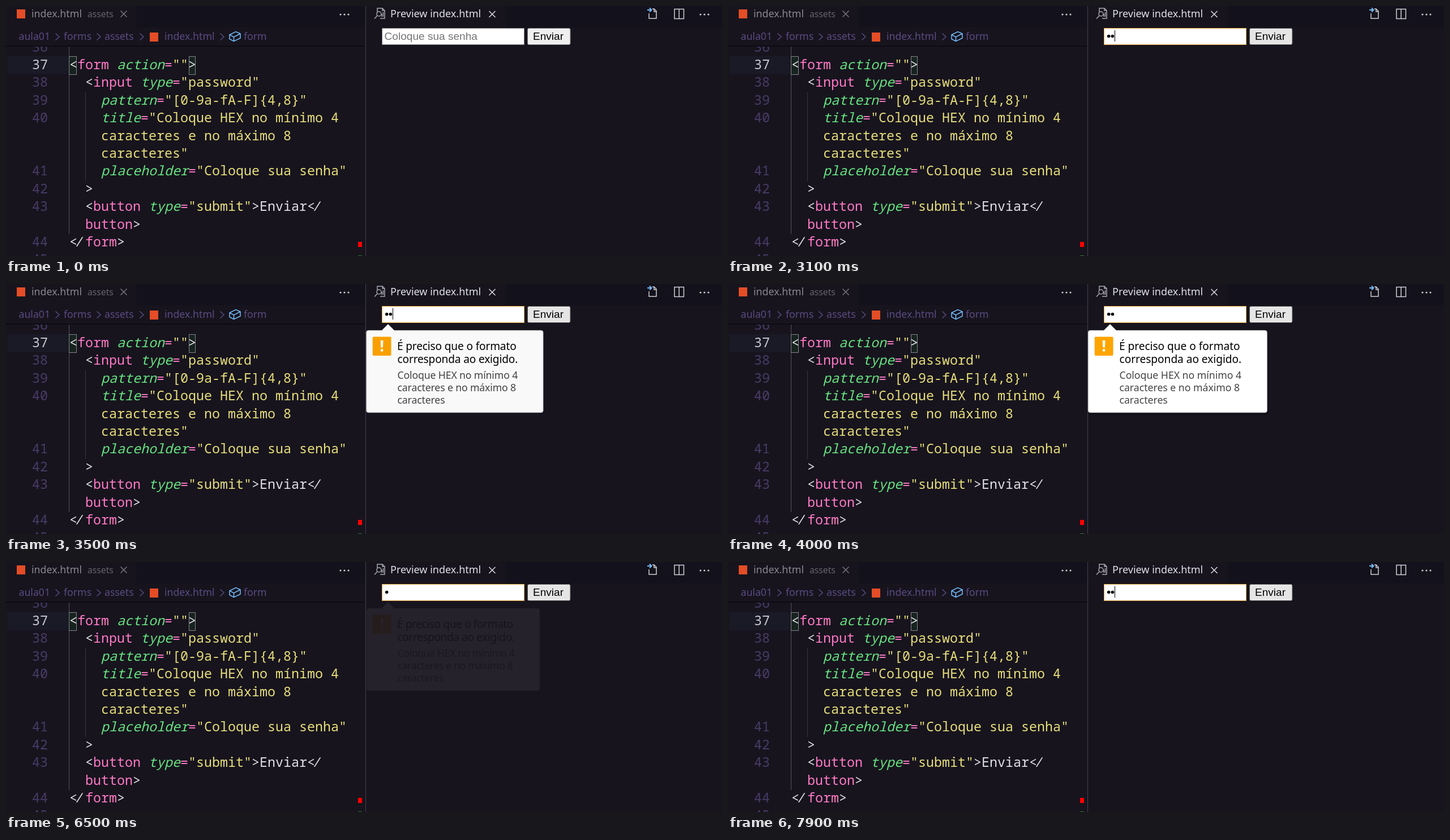
Write an HTML page that moves like this. It is 1265 by 443 pixels and loops after 8000 ms.

```html
<!DOCTYPE html>
<html lang="pt-BR">
<head>
<meta charset="utf-8">
<title>Password pattern validation</title>
<style>
  html, body { margin: 0; width: 100%; height: 100%; overflow: hidden; background: #17141e; }
  svg { display: block; width: 1265px; height: 443px; }
  text { white-space: pre; font-family: "Noto Sans", "Open Sans", sans-serif; }
  .code text { font-family: "Noto Sans Mono", "DejaVu Sans Mono", monospace; font-size: 23.33px; }
  .num { fill: #483c67; }
  .w, .slash { fill: #e1e1e6; }
  .p { fill: #ff79c6; }
  .g { fill: #67e480; }
  .g, .slash { font-style: italic; }
  .y { fill: #e7de79; }
  .crumb { font-size: 17.7px; fill: #5a4b81; }
  .tab { font-size: 18px; }
  .field text { font: 19.07px "Liberation Sans", Arial, sans-serif; }
  .line { fill: none; stroke-width: 1.5; }
  .main { font-size: 19.1px; fill: #000; }
  .sub { font-size: 17.7px; fill: #444; }
</style>
</head>
<body>
<svg viewBox="0 0 1265 443">
  <defs>
    <filter id="shadow" x="-10%" y="-10%" width="120%" height="125%">
      <feDropShadow dx="1" dy="2" stdDeviation="2" flood-color="#000" flood-opacity=".55"/>
    </filter>
    <path id="close" class="line" d="M-5.5-5.5 5.5 5.5M5.5-5.5-5.5 5.5"/>
    <path id="chevron" class="line" d="M-3.5-6 3 0-3.5 6" stroke="#5a4b81"/>
    <g id="dots" fill="#d0d0d6">
      <circle cx="-7" r="1.6"/><circle r="1.6"/><circle cx="7" r="1.6"/>
    </g>
  </defs>
  <rect width="1265" height="443" fill="#17141e"/>

  <!-- editor -->
  <rect y="89" x="2" width="108" height="32" fill="#1a1926"/>
  <g fill="#17231f" stroke="#85858c">
    <rect x="111.5" y="89.5" width="13" height="32"/>
    <rect x="323.5" y="89.5" width="11" height="32"/>
  </g>
  <path d="M111.5 70V89M111.5 122V404" stroke="#56535f"/>
  <path d="M140.5 153V310" stroke="#383544"/>
  <g class="code" id="code"></g>
  <rect x="622" y="418" width="7" height="9" fill="#f00"/>
  <rect x="622" y="442" width="7" height="1" fill="#2f7a2f"/>

  <!-- tabs and breadcrumbs -->
  <rect width="635" height="71" fill="#17141e"/>
  <rect y="70" width="635" height="2" fill="#0d0b12"/>
  <rect x="230" width="405" height="38" fill="#13111b"/>
  <rect x="883" width="382" height="38" fill="#13111b"/>
  <rect x="635" width="1" height="443" fill="#45424f"/>
  <g fill="#e44d26">
    <rect x="19" y="6" width="15" height="16"/>
    <rect x="254" y="47" width="15" height="16"/>
  </g>
  <text class="tab" x="45" y="20" style="font-size:17.8px" fill="#8a8792">index.html</text>
  <text x="144" y="20" font-size="15.7" fill="#66636f">assets</text>
  <use href="#close" x="208" y="14" stroke="#77737f"/>
  <use href="#dots" x="598" y="15"/>
  <g class="crumb">
    <text x="22.5" y="60">aula01</text>
    <text x="102" y="60">forms</text>
    <text x="174" y="60">assets</text>
    <text x="280" y="60">index.html</text>
    <text x="420" y="60">form</text>
  </g>
  <use href="#chevron" x="91" y="54.5"/>
  <use href="#chevron" x="164" y="54.5"/>
  <use href="#chevron" x="240" y="54.5"/>
  <use href="#chevron" x="382" y="54.5"/>
  <path class="line" stroke="#75beff" d="M395 51 406 45.5 414 49V57L402.5 62.5 395 58.5ZM395 51 402.5 55 414 49M402.5 55V62"/>

  <!-- preview toolbar -->
  <g class="line" stroke="#a9a8ae">
    <path d="M656 11V4H665L669 8V22H661M665 4V8H669M664 19V14M666.5 19V11"/>
    <circle cx="659" cy="14" r="4"/>
    <path d="M656 17 651 22.5"/>
  </g>
  <text class="tab" x="679" y="20" fill="#e1e1e6">Preview index.html</text>
  <use href="#close" x="859" y="14.5" stroke="#dcdce0"/>
  <path class="line" stroke="#d0d0d6" d="M1136 13V22H1149V9L1145 5H1142M1145 5V10H1149"/>
  <path class="line" stroke="#75beff" style="stroke-width:2" d="M1133 7H1140M1137 3.5 1140.5 7 1137 10.5"/>
  <path class="line" stroke="#d0d0d6" d="M1181 5.5H1197.5V22.5H1181ZM1189.2 5.5V22.5"/>
  <use href="#dots" x="1234" y="15"/>

  <!-- form -->
  <g class="field">
    <rect id="input" x="664.5" y="39.5" width="251" height="29" fill="#fff"/>
    <text id="hint" x="668.6" y="60" fill="#757575">Coloque sua senha</text>
    <circle class="dot" cx="672.7" cy="53.5" r="2.8"/>
    <circle class="dot" cx="679.4" cy="53.5" r="2.8"/>
    <rect id="caret" width="1" height="20"/>
    <rect id="button" x="921.5" y="39.5" width="75.5" height="29" rx="2.5"/>
    <text x="931" y="60">Enviar</text>
  </g>

  <!-- validation bubble -->
  <g id="bubble">
    <path id="box" fill="#fff" stroke="#77767c" stroke-width=".6"/>
    <rect x="647.7" y="93.5" width="32.8" height="33.5" rx="2" fill="#ffa400"/>
    <path d="M661.7 100H666.5L665.9 112.5H662.3ZM662 115.2H666.2V119.4H662Z" fill="#fff"/>
    <g class="main">
      <text x="691" y="117">É preciso que o formato</text>
      <text x="691.5" y="140">corresponda ao exigido.</text>
    </g>
    <g class="sub">
      <text x="691.5" y="168">Coloque HEX no mínimo 4</text>
      <text x="691.5" y="190">caracteres e no máximo 8</text>
      <text x="691.5" y="211.7">caracteres</text>
    </g>
  </g>
</svg>
<script>
const LOOP = 8000, TICK = 100;
const CELL = 14, LEFT = 112, TOP = 112, ROW = 31.4;
const SHOW = 3127;
const $ = id => document.getElementById(id);

// [row, line number, column, tokens]; each token starts with its colour class
const lines = [
  [-1, 36, 0, ''],
  [0, 37, 0, 'w<|pform|w |gaction|p=|y""|w>'],
  [1, 38, 2, 'w<|pinput|w |gtype|p=|y"password"'],
  [2, 39, 4, 'gpattern|p=|y"[0-9a-fA-F]{4,8}"'],
  [3, 40, 4, 'gtitle|p=|y"Coloque HEX no mínimo 4'],
  [4, '', 4, 'ycaracteres e no máximo 8'],
  [5, '', 4, 'ycaracteres"'],
  [6, 41, 4, 'gplaceholder|p=|y"Coloque sua senha"'],
  [7, 42, 2, 'w>'],
  [8, 43, 2, 'w<|pbutton|w |gtype|p=|y"submit"|w>Enviar|w<|w/'],
  [9, '', 2, 'pbutton|w>'],
  [10, 44, 0, 'w<|w/|pform|w>'],
  [11, 45, 0, '']
];

function addText(x, y, str, cls) {
  const el = document.createElementNS('http://www.w3.org/2000/svg', 'text');
  el.setAttribute('x', x);
  el.setAttribute('y', y);
  el.setAttribute('class', cls);
  el.textContent = str;
  $('code').append(el);
  return el;
}

for (const [row, num, col, tokens] of lines) {
  const y = TOP + row * ROW;
  const label = addText(46, y, num, 'num');
  if (num === 37) label.style.fill = '#c9c8d0';
  let x = LEFT + col * CELL;
  for (const token of tokens.split('|')) {
    const str = token.slice(1);
    // the closing slash leans tight against its bracket, like a ligature
    if (str === '/') addText(x - 5, y, str, 'slash');
    else if (str) addText(x, y, str, token[0]);
    x += str.length * CELL;
  }
}

// Step tables: [start, value]
const typed = [[0, 0], [1600, 1], [1700, 2], [6500, 1], [6600, 0], [7600, 1], [7900, 2]];
const caretOn = [[0, 0], [800, 1], [1400, 0], [1600, 1], [2300, 0], [2900, 1], [3800, 0],
  [4400, 1], [4900, 0], [5500, 1], [6200, 0], [6600, 1], [7300, 0], [7600, 1]];
const border = [[0, '#767676'], [300, '#4f4f4f'], [800, '#e3a63a'], [2700, '#767676'], [2900, '#e3a63a']];
const buttonLook = [[0, ['#efefef', '#767676']], [2500, ['#e5e5e5', '#4f4f4f']],
  [2700, ['#f5f5f5', '#8d8d8d']], [2900, ['#e5e5e5', '#4f4f4f']]];
const fadeOut = [[6500, .06], [6600, .02], [6700, 0]];

const at = (steps, t) => steps.reduce((v, [start, value]) => t >= start ? value : v, steps[0][1]);

// Cubic Bézier easing solved by bisection
function ease(p, x1, y1, x2, y2) {
  p = Math.min(1, Math.max(0, p));
  const curve = (s, a, b) => 3 * (1 - s) ** 2 * s * a + 3 * (1 - s) * s * s * b + s ** 3;
  let lo = 0, hi = 1;
  for (let i = 0; i < 24; i++) {
    const mid = (lo + hi) / 2;
    if (curve(mid, x1, x2) < p) lo = mid; else hi = mid;
  }
  return curve(lo, y1, y2);
}

function drawBubble(t) {
  const hiding = t >= 6500;
  const opacity = hiding ? at(fadeOut, t) : ease((t - SHOW) / 467, .4, 0, .2, 1);
  const spread = hiding ? 0 : ease((t - SHOW) / 1300, .05, 0, .2, 1);
  const left = 637 - spread, right = 943 + 10.3 * spread;
  const bubble = $('bubble');
  bubble.style.display = opacity > .001 ? '' : 'none';
  bubble.style.opacity = opacity;
  bubble.style.letterSpacing = -.4 * (1 - spread) + 'px';
  bubble.style.filter = spread > .7 ? 'url(#shadow)' : 'none';
  $('box').setAttribute('d', `M${left + 4} 82H664L675 71 686 82H${right - 4}q4 0 4 4V224q0 4 -4 4` +
    `H${left + 4}q-4 0 -4 -4V86q0 -4 4 -4Z`);
}

function draw(t) {
  const count = at(typed, t);
  $('hint').style.display = count ? 'none' : '';
  document.querySelectorAll('.dot').forEach((dot, i) => dot.style.display = i < count ? '' : 'none');
  $('caret').setAttribute('x', Math.round(670 + count * 6.5));
  $('caret').setAttribute('y', count ? 43 : 44);
  $('caret').style.display = at(caretOn, t) ? '' : 'none';
  $('input').style.stroke = at(border, t);
  const [fill, stroke] = at(buttonLook, t);
  $('button').style.fill = fill;
  $('button').style.stroke = stroke;
  drawBubble(t);
}

const began = performance.now();
function frame() {
  const t = (performance.now() - began) % LOOP;
  draw(Math.floor(t / TICK) * TICK);
  requestAnimationFrame(frame);
}
frame();
</script>
</body>
</html>
```
